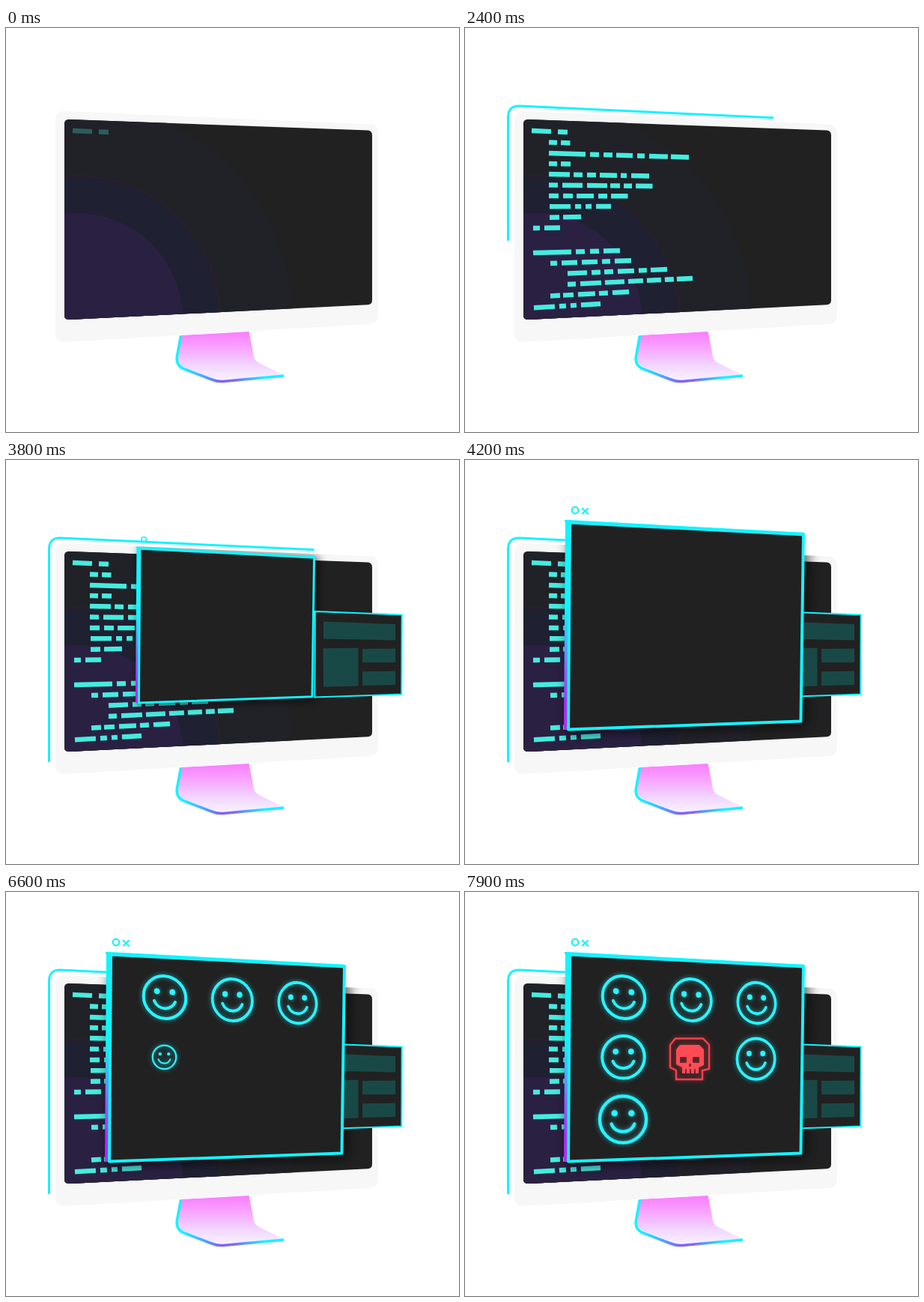
These frames come from a looping animation (605x539 px, 8000 ms). An HTML page without scripts:

```html
<!DOCTYPE html>
<html lang="en">
<head>
<meta charset="utf-8">
<title>Monitor</title>
<style>
@property --t { syntax: "<number>"; inherits: true; initial-value: 0; }
@keyframes clock { from { --t: 0; } to { --t: 8000; } }
html, body { margin: 0; width: 100%; height: 100%; overflow: hidden; background: #fff; }
/* --t is the loop time in ms, --s an element's start, --a its age */
svg { display: block; width: 605px; height: 539px; animation: clock 8s linear infinite; }
.show, .pop, .open {
  --a: calc(var(--t) - var(--s) + 2);
  opacity: clamp(0, var(--a), 1);
}
.pop {
  scale: calc(.54 + .0056 * clamp(0, var(--a), 100) - .000333 * clamp(0, var(--a) - 100, 300));
  transform-origin: 0 0;
}
.open {
  scale: calc(.38 + .00355 * clamp(0, var(--a), 200) - .0003 * clamp(0, var(--a) - 200, 300));
}
.main { --s: 3700; transform-origin: 293px 220px; }
.side { --s: 2700; transform-origin: 471px 259px; }
.code {
  fill: none; stroke: #45ece0; stroke-width: 6.4;
  opacity: clamp(0, .3 + var(--t) * .000368, 1);
}
.code path { --s: calc(var(--row) * 111); }
.trace {
  stroke-dasharray: 648 700;
  stroke-dashoffset: calc(1px * (649 - .4625 * clamp(0, var(--t) - 1000, 800) - .266 * clamp(0, var(--t) - 1800, 1050)));
}
.line { fill: none; stroke: #14f3ff; }
.glow { filter: drop-shadow(0 0 3px #14f3ff99); }
.alarm { filter: drop-shadow(0 0 3px #ff3b4a99); }
</style>
</head>
<body>
<svg viewBox="0 0 605 539" xmlns="http://www.w3.org/2000/svg">
  <defs>
    <linearGradient id="foot" x1="0" y1="0" x2="0" y2="1">
      <stop offset="0" stop-color="#fb7cff"/>
      <stop offset=".35" stop-color="#f7a6ff"/>
      <stop offset=".7" stop-color="#f2d6ff"/>
      <stop offset="1" stop-color="#f8f2ff"/>
    </linearGradient>
    <linearGradient id="rim" gradientUnits="userSpaceOnUse" x1="228" y1="0" x2="371" y2="0">
      <stop offset=".06" stop-color="#14f3ff"/>
      <stop offset=".42" stop-color="#8060ff"/>
      <stop offset=".55" stop-color="#7a6cff"/>
      <stop offset=".82" stop-color="#14f3ff"/>
    </linearGradient>
    <linearGradient id="edge" x1="0" y1="0" x2="0" y2="1">
      <stop offset=".42" stop-color="#14f3ff"/>
      <stop offset=".7" stop-color="#7d6cff"/>
      <stop offset=".88" stop-color="#b02cff"/>
    </linearGradient>
    <filter id="blur" x="-20%" y="-20%" width="140%" height="140%"><feGaussianBlur stdDeviation="8"/></filter>
    <path id="bezel" d="M66 124Q66 110.500 79 111L486 128.500Q497 129 497 141V384Q497 394 486 395L80 419Q66 420 66 407Z"/>
    <path id="screen" d="M78 128Q78 121.500 85 122L483 136.500Q489 137 489 143V363Q489 369 483 369.300L85 389Q78 389.300 78 383Z"/>
    <path id="pane" d="M140 83.500L452 99.500L448.500 348.500L138 359.500Z"/>
    <clipPath id="onBezel"><use href="#bezel"/></clipPath>
    <clipPath id="onScreen"><use href="#screen"/></clipPath>
    <g id="smile">
      <circle r="28.300" fill="none" stroke="#2bf4ff" stroke-width="4"/>
      <circle cx="-10.300" cy="-7.500" r="3.900" fill="#2bf4ff"/>
      <circle cx="10.300" cy="-7.500" r="3.900" fill="#2bf4ff"/>
      <path d="M-14 5.500C-9 18 9 18 14 5.500" fill="none" stroke="#2bf4ff" stroke-width="4" stroke-linecap="round"/>
    </g>
    <g id="skull">
      <path d="M-19 -27.500H18L26 -19V13L17 15V27H-18V15L-26 11V-19Z" fill="none" stroke="#f8404c" stroke-width="2.400"/>
      <path fill="#ff4b54" fill-rule="evenodd" d="M-13 -19H13L19 -13V8L12 11V19H8V13H6V19H2V13H0V19H-4V13H-6V19H-10V11L-18 7V-13Z
        M-13 -3V5H-4V-3ZM4 -3V5H13V-3ZM-1 6V10H2V6Z"/>
    </g>
  </defs>

  <path fill="url(#foot)" d="M234 410L324.500 405L331 438Q332 444 338 447L371 463L288 470Q280 470 272 466L239 453Q229 448 230 440Z"/>
  <path fill="none" stroke="url(#rim)" stroke-width="3.600" d="M233.500 410.500L228.300 439Q227 450 237 454.500L272 468Q281 472 290 471.500L371 464"/>

  <use href="#bezel" fill="#f7f7f7"/>
  <use href="#screen" fill="#212121"/>
  <g clip-path="url(#onScreen)">
    <circle cx="95" cy="388" r="288" fill="#212128"/>
    <circle cx="95" cy="388" r="191" fill="#1f2031" stroke="#2b2029" stroke-width="2"/>
    <circle cx="95" cy="388" r="141" fill="#2a2142"/>
  </g>

  <g class="code">
    <path class="show" style="--row:0" d="M89 137L137 139" stroke-dasharray="26 9 13 99"/>
    <path class="show" style="--row:1" d="M112 152.500L140.500 153.500" stroke-dasharray="11 5 13 99"/>
    <path class="show" style="--row:2" d="M112 167L299 172.500" stroke-dasharray="49 6 12 6 12 5 22 6 10 6 25 4 25 99"/>
    <path class="show" style="--row:3" d="M112 181L141 181.500" stroke-dasharray="11 5 13 99"/>
    <path class="show" style="--row:4" d="M112 195L246 197.500" stroke-dasharray="28 5 12 6 12 5 23 5 8 6 25 99"/>
    <path class="show" style="--row:5" d="M112 209.500L250.500 211" stroke-dasharray="12 6 27 6 27 4 13 5 11 5 23 99"/>
    <path class="show" style="--row:6" d="M112 224L217.500 224.300" stroke-dasharray="13 6 13 5 23 6 12 5 23 99"/>
    <path class="show" style="--row:7" d="M113 238.200L195 238" stroke-dasharray="28 6 8 6 8 6 20 99"/>
    <path class="show" style="--row:8" d="M113 252.700L155 252" stroke-dasharray="13 5 24 99"/>
    <path class="show" style="--row:9" d="M91 267L127 266.500" stroke-dasharray="9 6 21 99"/>
    <path class="show" style="--row:10" d="M91 300L207 297" stroke-dasharray="51 6 12 7 12 6 23 99"/>
    <path class="show" style="--row:11" d="M114 314L222 310.300" stroke-dasharray="9 6 21 6 21 6 11 6 23 99"/>
    <path class="show" style="--row:12" d="M137 327.500L270 322" stroke-dasharray="26 6 12 5 12 6 22 6 11 5 23 99"/>
    <path class="show" style="--row:13" d="M137 342L304 334" stroke-dasharray="11 6 28 5 26 5 20 5 19 5 12 4 22 99"/>
    <path class="show" style="--row:14" d="M114 357.500L219 352" stroke-dasharray="13 4 14 6 23 5 12 6 23 99"/>
    <path class="show" style="--row:15" d="M92 373.300L181 368" stroke-dasharray="28 6 9 6 8 6 27 99"/>
  </g>

  <path class="line trace" stroke-width="3" pathLength="648" d="M412 119.700L73 104Q57.500 103.500 57.500 119V403"/>

  <g clip-path="url(#onBezel)">
    <g class="open main">
      <use href="#pane" x="3" y="2" fill="#000" fill-opacity=".55" stroke="#000" stroke-opacity=".4" stroke-width="12" filter="url(#blur)"/>
    </g>
  </g>

  <g class="open side">
    <path d="M412.800 202L528.700 206.500L528.300 312.500L412.300 316.500Z" fill="#212121" stroke="#14f3ff" stroke-width="2"/>
    <path fill="#194947" d="M424 215.500L520 219V240.500L424 238.500ZM423.500 251.300L470.500 250.800V301.500L424 302.700ZM476 252L520 251.500V270H476ZM476 282.300L520 281.500V300L476 301Z"/>
  </g>

  <g class="open main">
    <path fill="url(#edge)" d="M134 81L141 83L138 361L132 358.500Z"/>
    <use href="#pane" fill="#212121" stroke="#14f3ff" stroke-width="4" stroke-linejoin="round"/>
    <path class="line" stroke-width="3.400" d="M134.500 81.500L452 98.500" stroke-linecap="round"/>
    <circle class="line" cx="147" cy="67" r="4.300" stroke-width="2.200"/>
    <path class="line show" style="--s:3900" stroke-width="2.200" d="M156 64L165 72.500M164.500 64.300L156.300 72"/>
  </g>

  <g class="glow">
    <g transform="translate(212 140.500) skewY(4)"><use class="pop" href="#smile" style="--s:4800"/></g>
    <g transform="translate(302.300 144) skewY(3) scale(.94 .985)"><use class="pop" href="#smile" style="--s:5400"/></g>
    <g transform="translate(389.500 148) skewY(3) scale(.89 .96)"><use class="pop" href="#smile" style="--s:6000"/></g>
    <g transform="translate(211.500 220.300)"><use class="pop" href="#smile" style="--s:6600"/></g>
    <g transform="translate(388.600 222.700) scale(.89 .96)"><use class="pop" href="#smile" style="--s:7200"/></g>
    <g transform="translate(211 303.500)"><use class="pop" href="#smile" style="--s:7800"/></g>
  </g>
  <g class="alarm" transform="translate(300 223)"><use class="pop" href="#skull" style="--s:6900"/></g>
</svg>
</body>
</html>
```
